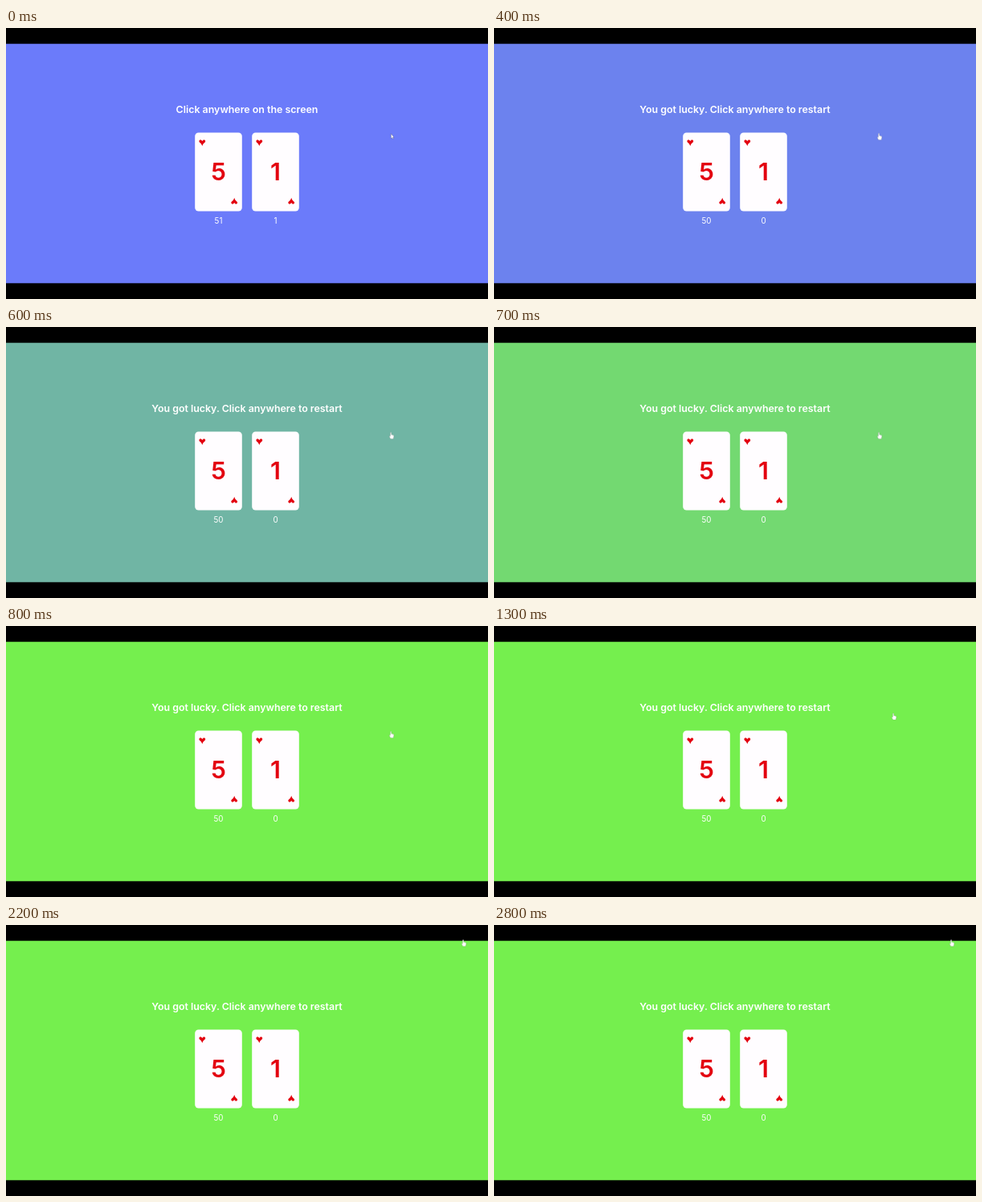
These frames come from a looping animation (600x338 px, 2900 ms). An HTML page:

```html
<!DOCTYPE html>
<html lang="en">
<head>
<meta charset="utf-8">
<title>Lucky cards</title>
<style>
  html, body { margin: 0; width: 100%; height: 100%; overflow: hidden; background: #000; }
  svg { display: block; width: 100%; height: 100%; }
  text { font-family: Inter, "Open Sans", sans-serif; text-anchor: middle; fill: #fff; }
  .title { font-size: 12.4px; font-weight: 600; }
  .rank { font-size: 30.5px; font-weight: 600; fill: #e3000f; }
  .count { font-size: 9.8px; }
  .heart { fill: #e3000f; }
  .card { fill: #fffdff; }

  .table, .before, .after, .pointer { animation: 2.9s step-end infinite; }
  .table { animation-name: tint; }
  .before { animation-name: hide; }
  .after { animation-name: show; }
  .pointer { animation-name: travel; }

  @keyframes tint {
    0% { fill: #6b7bfa; }
    10.34% { fill: #6b7df6; }
    13.79% { fill: #6c82ee; }
    17.24% { fill: #6d8fdd; }
    20.68% { fill: #70b5a4; }
    24.13% { fill: #73d971; }
    27.58%, 100% { fill: #75ef4e; }
  }
  @keyframes hide { 0% { opacity: 1; } 10.34%, 100% { opacity: 0; } }
  @keyframes show { 0% { opacity: 0; } 10.34%, 100% { opacity: 1; } }
  @keyframes travel {
    0% { transform: translate(480px, 135.5px); }
    41.37% { transform: translate(480px, 135.5px); animation-timing-function: steps(5); }
    58.61%, 100% { transform: translate(570px, 22.5px); }
  }
</style>
</head>
<body>
<svg viewBox="0 0 600 338">
  <defs>
    <path id="heart" class="heart" d="M0 4C-1-.1-3.9-.3-3.9-2.1C-3.9-4.3-.9-4.7 0-2.1C.9-4.7 3.9-4.3 3.9-2.1C3.9-.3 1-.1 0 4Z"/>
    <g id="card">
      <rect class="card" x="-29.3" y="130.5" width="58.6" height="98" rx="4.5"/>
      <use href="#heart" x="-20.2" y="143.3"/>
      <use href="#heart" transform="translate(19.7 215.7) rotate(180)"/>
    </g>
  </defs>

  <rect width="600" height="338"/>
  <rect class="table" y="19.7" width="600" height="298.6"/>

  <g transform="translate(264.5 0)">
    <use href="#card"/>
    <text class="rank" y="190.3">5</text>
    <text class="count before" y="244.3">51</text>
    <text class="count after" y="244.3">50</text>
  </g>
  <g transform="translate(335.5 0)">
    <use href="#card"/>
    <text class="rank" y="190.3">1</text>
    <text class="count before" y="244.3">1</text>
    <text class="count after" y="244.3">0</text>
  </g>

  <text class="title before" x="300" y="106">Click anywhere on the screen</text>
  <text class="title after" x="300" y="106">You got lucky. Click anywhere to restart</text>

  <path class="before" d="M479.3 131.8V138L480.6 136.8L481.5 138.3L482.3 137.9L481.5 136.3H483Z" fill="#fff" stroke="#4a4f80" stroke-width=".4"/>
  <g class="after">
    <path class="pointer" d="M-1.6-3.7Q-.9-4.6-.3-3.7V-1.2L2.3-.6Q3-.3 2.9.5L2.2 4H-1.3L-3 .9Q-2.7 0-1.6.7Z" fill="#fff" stroke="#555" stroke-opacity=".5" stroke-width=".4"/>
  </g>
</svg>
</body>
</html>
```
